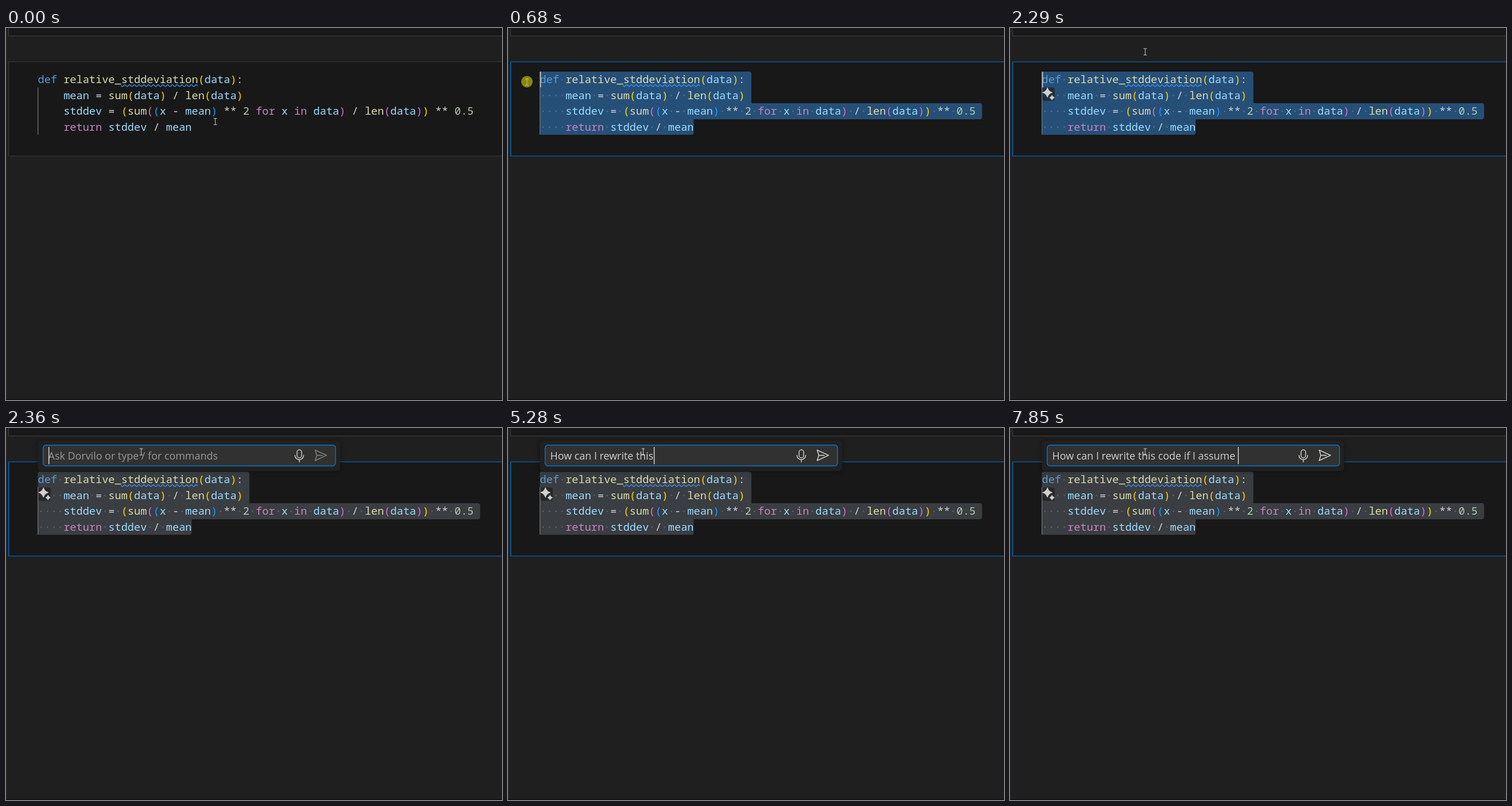
An HTML page with a canvas for the animation above (8000 ms loop, 864 px wide and 648 px high).

```html
<!DOCTYPE html>
<html lang="en">
<head>
<meta charset="utf-8">
<title>Inline chat in a notebook cell</title>
<style>
  html, body { margin: 0; width: 100%; height: 100%; overflow: hidden; background: #1f1f1f; }
  canvas { display: block; width: 864px; height: 648px; }
</style>
</head>
<body>
<canvas id="stage" width="864" height="648"></canvas>
<script>
const ctx = document.getElementById('stage').getContext('2d');
const LOOP = 8000;

const CODE = [
  'def relative_stddeviation(data):',
  '    mean = sum(data) / len(data)',
  '    stddev = (sum((x - mean) ** 2 for x in data) / len(data)) ** 0.5',
  '    return stddev / mean'
];
const CODE_FONT = '18.61px "Noto Sans Mono", monospace';
const UI_FONT = '17.9px "Open Sans", sans-serif';
const LEFT = 55.5, TOP = 76, COL = 11.165, ROW = 27.5;

const BRACKETS = ['#ffd700', '#da70d6', '#179fff'];
const PALETTE = {
  def: '#569cd6', return: '#c586c0', for: '#c586c0', in: '#c586c0',
  relative_stddeviation: '#dcdcaa', sum: '#dcdcaa', len: '#dcdcaa'
};

const PROMPT = 'How can I rewrite this code if I assume ';
const PLACEHOLDER = 'Ask Dorvilo or type / for commands';

// Runs of evenly spaced keystrokes: [first time, last time, count]
const KEY_RUNS = [
  [3017, 3560, 8], [3700, 3830, 2], [3980, 4030, 2], [4370, 4370, 1], [4570, 4570, 1],
  [4710, 4950, 4], [5090, 5280, 4], [5410, 5840, 6], [5930, 6090, 3], [6270, 6270, 1],
  [6430, 6430, 1], [6720, 6720, 1], [6950, 7040, 2], [7180, 7270, 2], [7750, 7850, 2]
];
const KEY_TIMES = KEY_RUNS.flatMap(([a, b, n]) =>
  Array.from({ length: n }, (_, i) => n > 1 ? Math.round(a + (b - a) * i / (n - 1)) : a));

const PRESS = 430, RELEASE = 890, ICON = 945, OPEN = 2360;
const DRAG = [[430, 346, 175], [490, 300, 166], [550, 190, 140], [610, 85, 108], [680, 33, 94], [720, 22, 94]];

const between = (t, a, b) => t >= a && t < b;
const lerp = (a, b, k) => a + (b - a) * k;

// Progress that advances in n equal jumps from a to b
function stepped(t, a, b, n) {
  if (t < a) return 0;
  return Math.min(1, (Math.floor((t - a) / (b - a) * (n - 1) + 1e-6) + 1) / n);
}

function pointerAt(t) {
  if (t < PRESS) {
    const k = stepped(t, 40, 230, 4);
    return [lerp(364.5, 346, k), lerp(163, 175, k)];
  }
  if (t < RELEASE) return DRAG.filter(p => p[0] <= t).pop().slice(1);
  const k = stepped(t, RELEASE, 1550, 13), e = k * k * (3 - 2 * k);
  return [lerp(22, 235.5, e), lerp(94, 41.5, e)];
}

function selectionHead(t) {
  const [x, y] = pointerAt(Math.min(t, RELEASE - 1));
  const row = Math.max(0, Math.min(3, Math.floor((y - TOP) / ROW)));
  const col = Math.max(0, Math.min(CODE[row].length, Math.round((x - LEFT) / COL)));
  return { row, col };
}

function rect(x, y, w, h, color) {
  ctx.fillStyle = color;
  ctx.fillRect(x, y, w, h);
}

function rounded(x, y, w, h, r, fill) {
  ctx.beginPath();
  ctx.roundRect(x, y, w, h, r);
  ctx.fillStyle = fill;
  ctx.fill();
}

function strokePath(d, color, width) {
  ctx.strokeStyle = color;
  ctx.lineWidth = width;
  ctx.lineJoin = ctx.lineCap = 'round';
  ctx.stroke(new Path2D(d));
}

function drawCells(focused) {
  rect(0, 0, 864, 648, '#1f1f1f');
  rect(0, 0, 1, 648, '#2b2b2b');
  rect(0, 646.5, 864, 1.5, '#181116');
  rect(5, 0, 859, 13.5, '#181818');
  rect(5, 59, 859, 164, '#181818');
  ctx.lineWidth = 1.2;
  ctx.strokeStyle = '#3a3a3b';
  ctx.strokeRect(4.5, -10, 900, 23.8);
  ctx.strokeStyle = focused ? '#0078d4' : '#3a3a3b';
  ctx.strokeRect(4.6, 59, 900, 164);
}

function drawSelection(t) {
  const head = selectionHead(t);
  const color = t < OPEN ? '#264f78' : '#3a3d41';
  const width = row => row < head.row || row > 3 ? 0 : CODE[row].length + (row < 3 ? 1 : 0);
  for (let row = head.row; row < 4; row++) {
    const start = row === head.row ? head.col : 0, w = width(row);
    if (w <= start) continue;
    const tr = w > width(row - 1) ? 4 : 0, br = w > width(row + 1) ? 4 : 0;
    const tl = row === head.row ? 3 : 0, bl = row === 3 ? 3 : 0;
    rounded(LEFT + start * COL, TOP + row * ROW, (w - start) * COL, ROW + (row < 3 ? 0.5 : 0), [tl, tr, br, bl], color);
    ctx.fillStyle = 'rgba(227,228,226,.2)';
    for (let c = start; c < CODE[row].length; c++) {
      if (CODE[row][c] !== ' ') continue;
      ctx.beginPath();
      ctx.arc(LEFT + (c + .5) * COL, TOP + row * ROW + 14.2, 1.4, 0, 7);
      ctx.fill();
    }
  }
}

function drawCode() {
  ctx.font = CODE_FONT;
  CODE.forEach((line, row) => {
    let depth = 0;
    for (const { 0: token, index } of line.matchAll(/[a-z_]+|[\d.]+|[()]|[^\s\w()]+/g)) {
      let color = '#d4d4d4';
      if (token === '(') color = BRACKETS[depth++];
      else if (token === ')') color = BRACKETS[--depth];
      else if (/^\d/.test(token)) color = '#b5cea8';
      else if (/^[a-z]/.test(token)) color = PALETTE[token] || '#9cdcfe';
      ctx.fillStyle = color;
      ctx.fillText(token, LEFT + index * COL, TOP + row * ROW + 20.4);
    }
  });
  rect(55, 103.5, 1.3, 82.5, '#707070');

  ctx.beginPath();
  for (let x = 200.6; x <= 334; x += .5)
    ctx.lineTo(x, 100.4 + 1.5 * Math.sin((x - 200.6) / 8.3 * 2 * Math.PI));
  ctx.strokeStyle = '#3794ff';
  ctx.lineWidth = 1.4;
  ctx.stroke();
}

function drawEditorCaret(t) {
  if (!between(t, PRESS, OPEN) || between(t, 1110, 1450) || between(t, 1790, 2130)) return;
  const { row, col } = selectionHead(t);
  rect(LEFT + col * COL - .2, TOP + row * ROW, 2.4, ROW, '#aeafad');
}

function star(x, y, r) {
  const q = r * .22;
  ctx.beginPath();
  ctx.moveTo(x, y - r);
  for (let i = 1; i <= 4; i++) {
    const a = i * Math.PI / 2, m = a - Math.PI / 4;
    ctx.quadraticCurveTo(x + q * Math.sin(m) * 1.4, y - q * Math.cos(m) * 1.4,
      x + r * Math.sin(a), y - r * Math.cos(a));
  }
  ctx.closePath();
  ctx.fillStyle = ctx.strokeStyle = '#d0d0cd';
  ctx.lineWidth = 1.3;
  ctx.lineJoin = 'round';
  ctx.fill();
  ctx.stroke();
}

function drawSparkle() {
  rounded(56.5, 103.5, 21.5, 23.5, 4, 'rgba(31,31,31,.68)');
  star(65.2, 112.3, 8);
  star(73.2, 121.3, 3.8);
}

function drawChat(t) {
  const typed = PROMPT.slice(0, KEY_TIMES.filter(k => k <= t).length);
  ctx.save();
  ctx.shadowColor = 'rgba(0,0,0,.4)';
  ctx.shadowBlur = 9;
  rounded(55.5, 22, 526.5, 53, 6, '#202020');
  ctx.restore();
  rounded(64.7, 29.7, 509.3, 36.3, 5, '#313131');
  ctx.strokeStyle = '#0078d4';
  ctx.lineWidth = 1.4;
  ctx.stroke();

  ctx.font = UI_FONT;
  ctx.fillStyle = typed ? '#d0d0d0' : '#989898';
  ctx.fillText(typed || PLACEHOLDER, 73.6, 54.8);
  if (!between(t, 2680, 2940) && !between(t, 7660, 7750))
    rect(Math.round(74 + ctx.measureText(typed).width), 33, 1.3, 30, '#e4e4e4');

  strokePath('M507 42a4 4 0 0 1 8 0v6a4 4 0 0 1-8 0zM503.3 47.5a7.6 7.6 0 0 0 15.2 0M511 55.2v4', '#c9cabf', 1.5);
  strokePath('M538.6 38.5L558.4 47.6L538.6 56.8L541.4 47.6zM541.4 47.6H551', typed ? '#c9cabf' : '#7d7d73', 1.6);
}

function drawPointer(t) {
  const [x, y] = pointerAt(t);
  const pressed = between(t, PRESS, RELEASE);
  if (pressed) {
    ctx.beginPath();
    ctx.arc(x, y - .5, 10, 0, 7);
    ctx.fillStyle = 'rgba(255,245,0,.5)';
    ctx.fill();
  }
  strokePath(`M${x - 2.5} ${y - 5.5}h5M${x} ${y - 5.5}v11M${x - 2.5} ${y + 5.5}h5`,
    pressed ? '#c5c184' : '#c8c8c8', 1);
}

function draw(t) {
  drawCells(t >= PRESS);
  if (t >= PRESS) drawSelection(t);
  drawCode();
  drawEditorCaret(t);
  if (t >= ICON) drawSparkle();
  if (t >= OPEN) drawChat(t);
  drawPointer(t);
}

const origin = performance.now();
function tick() {
  draw((performance.now() - origin) % LOOP);
  requestAnimationFrame(tick);
}
tick();
</script>
</body>
</html>
```
